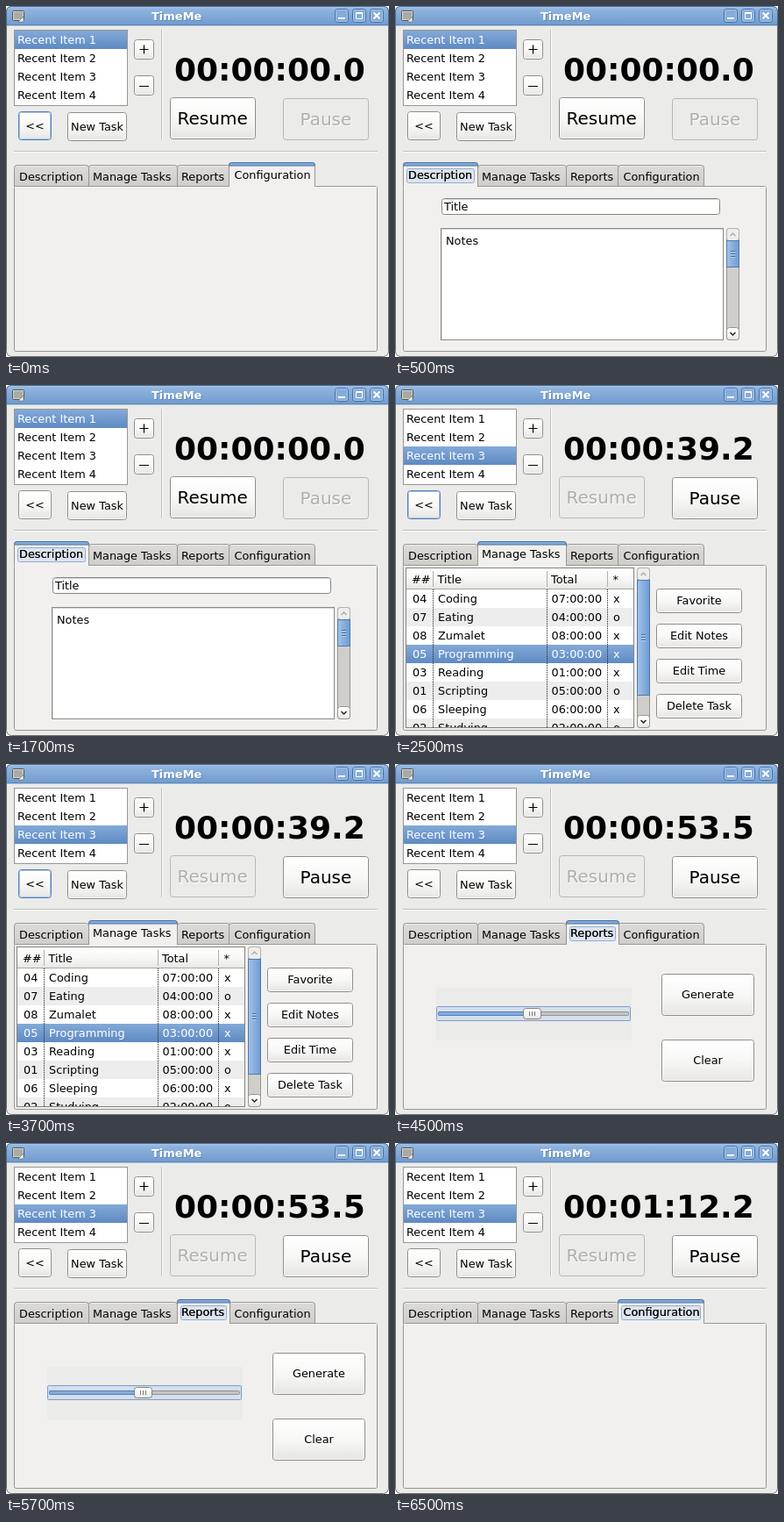
An HTML page that plays this animation: 437x400 px, repeating every 8 s.

```html
<!DOCTYPE html>
<html lang="en">
<head>
<meta charset="utf-8">
<title>Timer window</title>
<style>
html, body { margin: 0; width: 100%; height: 100%; overflow: hidden; background: #fff; }
svg { display: block; width: 437px; height: 400px; }
text { font: 12.85px "DejaVu Sans", sans-serif; fill: #000; white-space: pre; }
.mid { text-anchor: middle; }
.big { font-size: 20px; }
.clock { font-size: 36px; font-weight: bold; }
.caption { font-size: 13px; font-weight: bold; }
.light { fill: #fff; }
.dim { fill: #b1afab; }
.show { visibility: hidden; animation: 8s step-end infinite; }
.at0 { animation-name: at0; }
.at1 { animation-name: at1; }
.at2 { animation-name: at2; }
.at3 { animation-name: at3; }
.at4 { animation-name: at4; }
.at01 { animation-name: at01; }
.at02 { animation-name: at02; }
.at04 { animation-name: at04; }
.at134 { animation-name: at134; }
.at123 { animation-name: at123; }
.at034 { animation-name: at034; }
.at014 { animation-name: at014; }
.at024 { animation-name: at024; }
.at234 { animation-name: at234; }
.at0134 { animation-name: at0134; }
.at0124 { animation-name: at0124; }
.at0234 { animation-name: at0234; }
@keyframes at0 { 0% { visibility: visible } 6.25%, 100% { visibility: hidden } }
@keyframes at1 { 0%, 31.25%, 100% { visibility: hidden } 6.25% { visibility: visible } }
@keyframes at2 { 0%, 56.25%, 100% { visibility: hidden } 31.25% { visibility: visible } }
@keyframes at3 { 0%, 81.25%, 100% { visibility: hidden } 56.25% { visibility: visible } }
@keyframes at4 { 0% { visibility: hidden } 81.25%, 100% { visibility: visible } }
@keyframes at01 { 0% { visibility: visible } 31.25%, 100% { visibility: hidden } }
@keyframes at234 { 0% { visibility: hidden } 31.25%, 100% { visibility: visible } }
@keyframes at02 { 0%, 31.25% { visibility: visible } 6.25%, 56.25%, 100% { visibility: hidden } }
@keyframes at134 { 0%, 31.25% { visibility: hidden } 6.25%, 56.25%, 100% { visibility: visible } }
@keyframes at04 { 0%, 81.25%, 100% { visibility: visible } 6.25% { visibility: hidden } }
@keyframes at123 { 0%, 81.25%, 100% { visibility: hidden } 6.25% { visibility: visible } }
@keyframes at0234 { 0%, 31.25%, 100% { visibility: visible } 6.25% { visibility: hidden } }
@keyframes at0134 { 0%, 56.25%, 100% { visibility: visible } 31.25% { visibility: hidden } }
@keyframes at0124 { 0%, 81.25%, 100% { visibility: visible } 56.25% { visibility: hidden } }
</style>
</head>
<body>
<svg id="stage" viewBox="0 0 437 400">
  <defs>
    <linearGradient id="bar" x2="0" y2="1">
      <stop offset="0" stop-color="#a9c6e9"/><stop offset=".15" stop-color="#8fb3de"/>
      <stop offset="1" stop-color="#6f9acd"/>
    </linearGradient>
    <linearGradient id="pick" x2="0" y2="1">
      <stop offset="0" stop-color="#83a9d8"/><stop offset="1" stop-color="#5e8ac2"/>
    </linearGradient>
    <linearGradient id="face" x2="0" y2="1">
      <stop offset="0" stop-color="#fff"/><stop offset=".5" stop-color="#f8f8f7"/>
      <stop offset="1" stop-color="#e6e5e3"/>
    </linearGradient>
    <linearGradient id="tab" x2="0" y2="1">
      <stop offset="0" stop-color="#dcdbd9"/><stop offset="1" stop-color="#cfcdca"/>
    </linearGradient>
    <linearGradient id="thumb">
      <stop offset="0" stop-color="#a3c2e8"/><stop offset="1" stop-color="#6e9bd2"/>
    </linearGradient>
    <clipPath id="rows"><rect x="13" y="209" width="259" height="181"/></clipPath>
  </defs>
</svg>
<script>
// Boxes take their first and last pixel on each axis.
const box = (x1, y1, x2, y2, fill, line, r = 0) =>
  `<rect x="${x1 + .5}" y="${y1 + .5}" width="${x2 - x1}" height="${y2 - y1}" rx="${r}" fill="${fill}" stroke="${line}"/>`;
const fill = (x, y, w, h, color) => `<rect x="${x}" y="${y}" width="${w}" height="${h}" fill="${color}"/>`;
const path = (d, color, more = '') => `<path d="${d}" fill="none" stroke="${color}" ${more}/>`;
const text = (x, y, s, cls = '') =>
  `<text x="${x}" y="${y}" class="${cls}">${s.replace(/</g, '&lt;')}</text>`;
const show = (steps, ...parts) => `<g class="show at${steps}">${parts.join('')}</g>`;

const button = (x1, y1, x2, y2, line = '#8f8d89') =>
  box(x1, y1, x2, y2, 'url(#face)', line, 3) + box(x1 + 1, y1 + 1, x2 - 1, y2 - 1, 'none', '#ffffffa0', 2);
const labelled = (x1, y1, x2, y2, s) =>
  button(x1, y1, x2, y2) + text((x1 + x2 + 1) / 2, (y1 + y2) / 2 + 4, s, 'mid');

function chrome() {
  let s = box(0, 0, 436, 399, '#ebebea', '#6d6d6b', 6);
  s += '<path d="M.5 22.5V6.5Q.5.5 6.5.5H430.5Q436.5.5 436.5 6.5V22.5" fill="url(#bar)" stroke="#4a6a92"/>';
  s += path('M1 21.5H436', '#5f87b7');
  s += box(7, 5, 20, 16, '#d4d4d0', '#555753', 1) + fill(9, 7, 10, 8, '#a8aaa5');
  s += '<path d="M14 18L20 12V18Z" fill="#eeeeec" stroke="#666864" stroke-width=".6"/>';
  s += text(167, 17, 'TimeMe', 'caption').replace('<text', '<text style="fill:#47689180"');
  s += text(166, 16, 'TimeMe', 'caption light');
  for (const x of [375, 395, 415]) s += box(x, 3, x + 15, 18, '#86acdb', '#486f9f', 3) + box(x + 1, 4, x + 14, 17, 'none', '#a9c6e8', 2);
  s += path('M379 14H387', '#fff', 'stroke-width="2"');
  s += path('M399.5 8V14.5H406.5V7.5H399', '#fff') + path('M399 8H407', '#fff', 'stroke-width="2"');
  s += path('M419.5 7.5L426.5 14.5M426.5 7.5L419.5 14.5', '#fff', 'stroke-width="2"');
  return s;
}

function recent() {
  let s = box(9, 27, 138, 113, '#fff', '#999792');
  s += show('01', fill(10, 28, 128, 21, 'url(#pick)')) + show('234', fill(10, 70, 128, 21, 'url(#pick)'));
  for (let i = 0; i < 4; i++) {
    const item = cls => text(13, 43 + 21 * i, 'Recent Item ' + (i + 1), cls);
    if (i == 0) s += show('01', item('light')) + show('234', item());
    else if (i == 2) s += show('01', item()) + show('234', item('light'));
    else s += item();
  }
  return s;
}

function controls() {
  let s = button(146, 38, 168, 60) + button(146, 79, 168, 101);
  s += path('M152.5 49.5H162.5M157.5 44.5V54.5', '#000', 'stroke-width="1.2"') + path('M152 91.5H163', '#000');
  s += path('M177.5 27V152M9 165.5H424', '#c0bfbc') + path('M178.5 27V152M9 166.5H424', '#fbfbfa');
  s += show('134', button(14, 120, 51, 152));
  s += show('02', box(14, 120, 51, 152, 'url(#face)', '#557fb4', 3), box(15, 121, 50, 151, 'none', '#aac4e4', 2));
  s += text(33, 141, '<<', 'mid') + labelled(70, 121, 137, 153, 'New Task').replace('y="141"', 'y="142"');
  const big = (x, y, tx, ty, word, on, off) =>
    show(on, button(x, y, x + 97, y + 47), text(tx, ty, word, 'big')) +
    show(off, box(x, y, x + 97, y + 47, '#ebebea', '#b9b7b4', 3),
      text(tx + 1, ty + 1, word, 'big light'), text(tx, ty, word, 'big dim'));
  s += big(187, 104, 195.5, 135, 'Resume', '01', '234') + big(316, 105, 335.5, 136, 'Pause', '234', '01');
  s += show('01', text(192, 85, '00:00:00.0', 'clock'));
  ['00:00:39.2', '00:00:53.5', '00:01:12.2'].forEach((t, i) => s += show(i + 2, text(192, 85, t, 'clock')));
  return s;
}

const tabs = [
  ['Description', 9, 94, 15, '1', '0234', '1'],
  ['Manage Tasks', 94, 195, 99, '2', '0134', ''],
  ['Reports', 195, 255, 200, '3', '0124', '3'],
  ['Configuration', 254, 352, 260.5, '04', '123', '4']
];

function notebook() {
  let s = '';
  for (const [name, a, b, x, , off] of tabs)
    s += show(off, `<path d="M${a + .5} 206V184.5Q${a + .5} 181.5 ${a + 3.5} 181.5H${b - 2.5}Q${b + .5} 181.5 ${b + .5} 184.5V206" fill="url(#tab)" stroke="#979590"/>`,
      path(`M${a + 3} 182.5H${b - 2}`, '#ededeb'), text(x, 199, name));
  s += box(9, 205, 423, 393, '#f1f0ef', '#979590', 2) + path('M10 206.5H423', '#fff');
  for (const [name, a, b, x, on, , focus] of tabs) {
    s += show(on, `<path d="M${a + .5} 206V181.5Q${a + .5} 178.5 ${a + 3.5} 178.5H${b - 2.5}Q${b + .5} 178.5 ${b + .5} 181.5V206" fill="#f1f0ef" stroke="#979590"/>`,
      `<path d="M${a + .5} 182V181.5Q${a + .5} 178.5 ${a + 3.5} 178.5H${b - 2.5}Q${b + .5} 178.5 ${b + .5} 181.5V182Z" fill="#83aadb" stroke="#486f9f"/>`,
      fill(a + 1, 205, b - a - 1, 2, '#f1f0ef'), text(x, 197, name));
    if (focus) s += show(focus, box(a + 4, 185, b - 4, 201, '#7fa5d82a', '#91afd4', 2), text(x, 197, name));
  }
  return s;
}

function scrollbar(x, y1, y2, t1, t2) {
  const m = x + 7.5, c = (t1 + t2) / 2 | 0;
  let s = box(x, y1, x + 14, y2, '#d0cecb', '#96948f', 3);
  s += box(x, y1, x + 14, t1, '#efeeed', '#b3b1ad', 3) + box(x, y2 - 14, x + 14, y2, 'url(#face)', '#96948f', 3);
  s += box(x, t1, x + 14, t2, 'url(#thumb)', '#4f79ad');
  for (let i = -3; i <= 3; i += 3)
    s += path(`M${x + 5} ${c + i + .5}H${x + 10}`, '#456f9f') + path(`M${x + 5} ${c + i + 1.5}H${x + 10}`, '#b9d2ef');
  s += path(`M${m - 3} ${y1 + 9}l3 -3l3 3`, '#b0aeaa', 'stroke-width="1.5"');
  return s + path(`M${m - 3} ${y2 - 8}l3 3l3 -3`, '#222', 'stroke-width="1.5"');
}

const description = () =>
  box(53, 219, 370, 237, '#fff', '#85837f', 3) + path('M55 220.5H369', '#dcdbd9') + text(56, 233, 'Title') +
  box(52, 253, 374, 380, '#fff', '#8b8985') + path('M53.5 380V254.5H374', '#dddcda') + text(58, 272, 'Notes') +
  scrollbar(378, 253, 380, 267, 297);

function tasks() {
  const cols = [20, 49, 178.5, 249];
  const rows = `04 Coding 07:00:00 x
07 Eating 04:00:00 o
08 Zumalet 08:00:00 x
05 Programming 03:00:00 x
03 Reading 01:00:00 x
01 Scripting 05:00:00 o
06 Sleeping 06:00:00 x
02 Studying 02:00:00 o`.split('\n').map(r => r.split(' '));
  let s = box(12, 208, 272, 390, '#fff', '#85837f') + '<g clip-path="url(#rows)">';
  s += fill(13, 209, 259, 24, 'url(#face)') + path('M13 232.5H272', '#aaa8a4');
  rows.forEach((row, i) => {
    const y = 233 + 21 * i, on = i == 3;
    s += fill(13, y, 259, 21, on ? 'url(#pick)' : i % 2 ? '#ededed' : '#fff');
    row.forEach((t, k) => s += text(cols[k], y + 15, t, on ? 'light' : ''));
  });
  ['##', 'Title', 'Total', '*'].forEach((t, k) => s += text(cols[k] - (k ? .5 : 1), 226, t));
  for (const x of [43.5, 173.5, 242.5])
    s += path(`M${x} 212V230`, '#b2b0ac') + path(`M${x} 233V390`, '#222', 'stroke-dasharray="1 1"');
  s += '</g>' + scrollbar(276, 208, 390, 222, 353);
  ['Favorite', 'Edit Notes', 'Edit Time', 'Delete Task'].forEach((t, i) =>
    s += labelled(298, 232 + 40 * i, 395, 259 + 40 * i, t));
  return s;
}

function reports() {
  let s = fill(47, 255, 223, 60, '#ebebea') + box(47, 276, 268, 292, '#d5dfec', '#7e9dc6', 1);
  s += box(49, 282, 266, 286, '#c5c4c2', '#94928e', 1) + box(49, 282, 150, 286, '#83acdf', '#537fb5', 1);
  s += box(146, 278, 166, 290, 'url(#face)', '#85837f', 3);
  for (const x of [153.5, 156.5, 159.5]) s += path(`M${x} 282V287`, '#777');
  return s + labelled(304, 239, 409, 286, 'Generate') + labelled(304, 314, 409, 361, 'Clear');
}

document.getElementById('stage').insertAdjacentHTML('beforeend',
  chrome() + recent() + controls() + notebook() +
  show('1', description()) + show('2', tasks()) + show('3', reports()));
</script>
</body>
</html>
```
